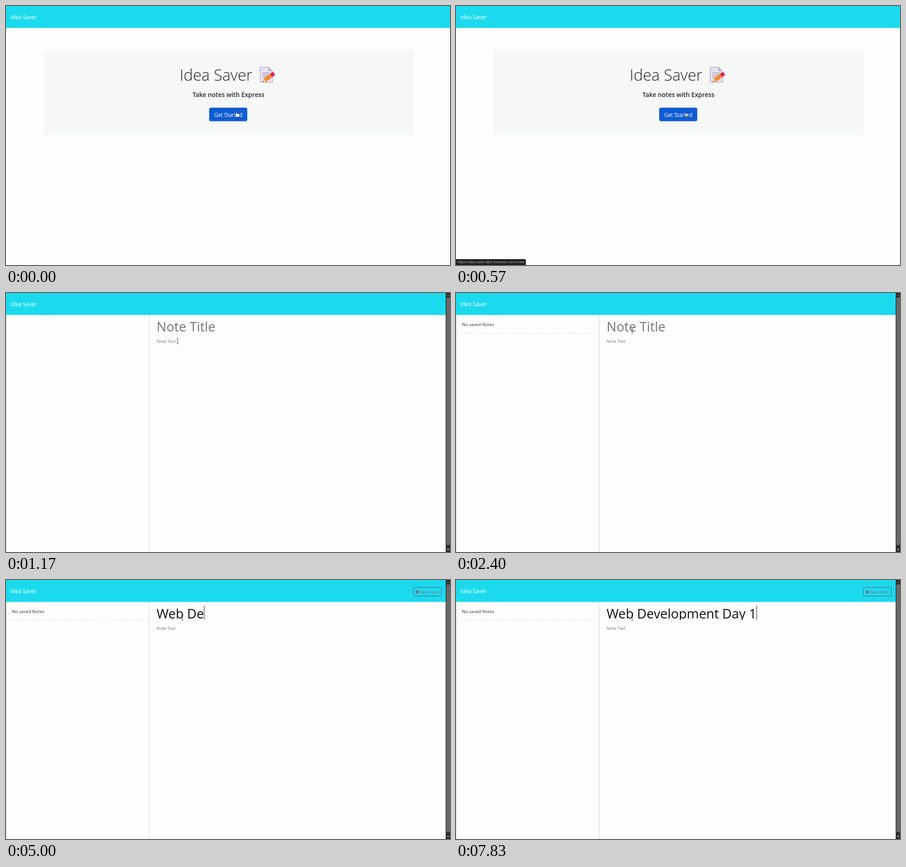
An HTML page for the animation above (8000 ms loop, 979x572 px).

```html
<!DOCTYPE html>
<html lang="en">
<head>
<meta charset="utf-8">
<title>Notes demo</title>
<style>
  html, body { margin: 0; width: 100%; height: 100%; overflow: hidden; background: #fdfdfd; }
  svg { display: block; width: 979px; height: 572px; font-family: "Open Sans", "Noto Sans", sans-serif; }
  text { white-space: pre; }
</style>
</head>
<body>
<svg viewBox="0 0 979 572">
  <defs>
    <clipPath id="field"><rect x="330" y="52" width="630" height="36"/></clipPath>
  </defs>
  <rect width="979" height="48.5" fill="#1cdaee"/>
  <text x="10" y="29" font-size="11.9" fill="#fff">Idea Saver</text>

  <g id="home">
    <rect x="83" y="98.5" width="815" height="186" fill="#f6f7f7"/>
    <text x="383" y="165" font-size="34.4" font-weight="300" fill="#24282c">Idea Saver</text>
    <g id="memo">
      <path d="M560.5 135h18.5l8.5 8.5v25h-27z" fill="#e8e2f0" stroke="#a298b0"/>
      <path d="M579 135v8.5h8.5z" fill="#c4bad0" stroke="#a298b0" stroke-width=".8"/>
      <path d="M565 147.5h17M565 151h17M565 154.500h14M565 158h10" stroke="#8d849a" stroke-width="1.2"/>
      <g transform="translate(566 167.500) rotate(-37)">
        <path d="M0 0L7-4.500V4.500z" fill="#fbd3a4"/>
        <path d="M0 0L2.500-1.600V1.600z" fill="#4b3f4e"/>
        <rect x="6" y="-4.500" width="18" height="9" fill="#f8862c"/>
        <rect x="23.500" y="-4.500" width="8" height="9" rx="2.500" fill="#e2205f"/>
      </g>
    </g>
    <text x="490.500" y="201" font-size="13.8" font-weight="600" fill="#24282c" text-anchor="middle">Take notes with Express</text>
    <rect x="448" y="224.500" width="84" height="30" rx="4" fill="#0e5dd4"/>
    <text x="490" y="244.500" font-size="11.75" fill="#fff" text-anchor="middle">Get Started</text>
  </g>

  <g id="notes">
    <path d="M.5 48.500V572M315.500 48.500V572" stroke="#d3d5d6"/>
    <g id="list">
      <text x="13" y="72.500" font-size="9.7" fill="#30343a">No saved Notes</text>
      <path d="M2 89H315" stroke="#e1e4d9" stroke-dasharray="3 2"/>
    </g>
    <g clip-path="url(#field)"><text id="title" x="332" y="85" font-size="28.8"></text></g>
    <rect id="caret" y="56.500" width="1" height="31.500" fill="#111"/>
    <text x="332" y="109.500" font-size="9.5" fill="#757575">Note Text</text>
    <g id="clear">
      <rect x="898" y="16.500" width="62" height="19" rx="3" fill="none" stroke="#5d5a72"/>
      <path d="M904 24l5 5m0-5l-5 5" stroke="#c22c42" stroke-width="2"/>
      <text x="912" y="30" font-size="8.2" fill="#94606f">Clear Form</text>
    </g>
    <rect x="969.500" width="10" height="572" fill="#2c2c2c"/>
    <rect x="971" y="10" width="8" height="546.500" fill="#686868"/>
    <path d="M972.500 6.500h4.500l-2.250-3z" fill="#777"/>
    <path d="M972.500 565h4.500l-2.250 3z" fill="#ddd"/>
  </g>

  <g id="status">
    <path d="M0 559H151.500a2.500 2.500 0 0 1 2.500 2.500V572H0z" fill="#202022"/>
    <text x="3" y="568" font-size="7.26" fill="#c9c9cb">https://idea-saver-dfy5.onrender.com/notes</text>
  </g>

  <g id="pointer" stroke="#111" stroke-width=".8" stroke-linejoin="round" fill="#fff">
    <path id="hand" d="M1-2c0-1.300 2-1.300 2 0v4l4.500 1q1.500.5 1.200 2.500l-.7 5h-5.500L-1 6.500q-.6-1.600.8-1.500L1 6z"/>
    <path id="arrow" d="M0 0V10.200L2.400 8 4 11.600l1.600-.7L4 7.400h3.300z"/>
    <path id="beam" d="M-2-5.500h1.500L0-5l.5-.5H2M0-5V5M-2 5.500h1.500L0 5l.5.5H2" fill="none"/>
  </g>
</svg>
<script>
const LOOP = 8000;
const PAGE_SWAP = 680;
const TITLE = "Web Development Day 1";
// time at which each letter of the title is typed
const KEYS = [3530, 3730, 3970, 4100, 4770, 5000, 5230, 5530, 5730, 6000, 6130,
  6470, 6570, 6670, 6830, 7000, 7270, 7430, 7570, 7630, 7830];
// pointer stops: time, x, y
const STOPS = [[0, 506, 235], [590, 506, 235], [835, 335, 206], [1300, 388.5, 83.5], [LOOP, 388.5, 83.5]];

const el = id => document.getElementById(id);
const [home, notes, list, title, caret, clear, status_, pointer, hand, arrow, beam] =
  ["home", "notes", "list", "title", "caret", "clear", "status", "pointer", "hand", "arrow", "beam"].map(el);
const show = (node, on) => node.setAttribute("display", on ? "inline" : "none");
const ramp = (t, from, to) => Math.min(1, Math.max(0, (t - from) / (to - from)));
const smooth = k => k * k * (3 - 2 * k);

function pointerAt(t) {
  const i = STOPS.findIndex(stop => t < stop[0]);
  const [t0, x0, y0] = STOPS[i - 1], [t1, x1, y1] = STOPS[i];
  const k = smooth(ramp(t, t0, t1));
  return [x0 + (x1 - x0) * k, y0 + (y1 - y0) * k];
}

function drawTitle(t) {
  const typed = KEYS.filter(key => key <= t).length;
  title.textContent = typed ? TITLE.slice(0, typed) : "Note Title";
  title.setAttribute("fill", typed ? "#111" : "#757575");
  // the caret blinks from the last key press, or from the click into the field
  const since = t - (typed ? KEYS[typed - 1] : 1350);
  show(caret, since >= 0 && Math.floor(since / 527) % 2 === 0);
  caret.setAttribute("x", 332 + (typed ? title.getComputedTextLength() : 0));
  show(clear, typed > 0);
}

function draw(t) {
  show(home, t < PAGE_SWAP);
  show(notes, t >= PAGE_SWAP);
  show(list, t >= 1900);
  drawTitle(t);
  status_.setAttribute("opacity", ramp(t, 30, 200) * (1 - ramp(t, 730, 980)));

  const [x, y] = pointerAt(t);
  pointer.setAttribute("transform", `translate(${x} ${y})`);
  const overField = t > 900 && y < 115;
  show(hand, t < 540);
  show(arrow, t >= 540 && !overField);
  show(beam, overField);
}

function tick() {
  draw(performance.now() % LOOP);
  requestAnimationFrame(tick);
}
tick();
</script>
</body>
</html>
```
